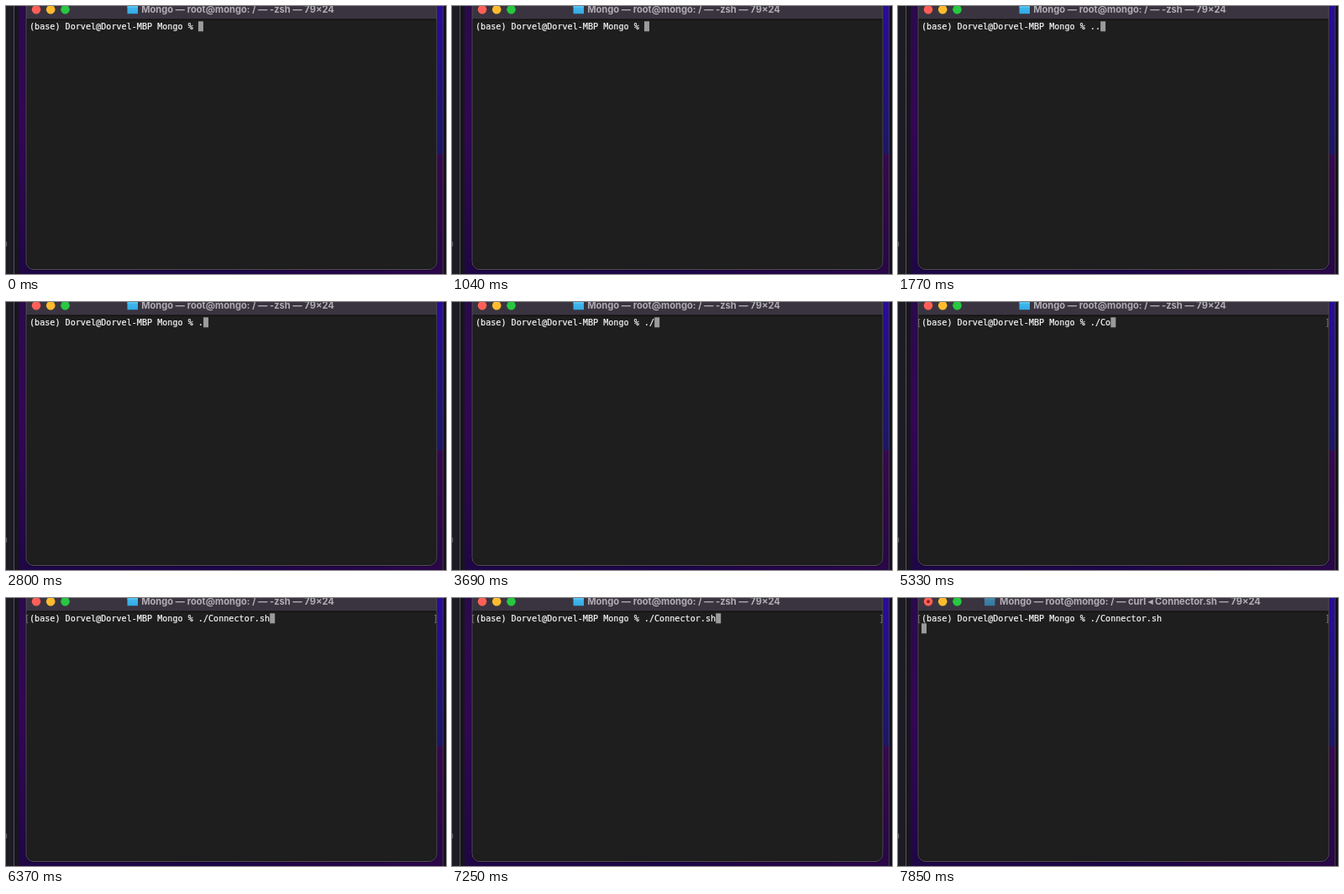
Animation of 524 by 320 pixels, one loop 7.99 s. Source, as an HTML page:

```html
<!DOCTYPE html>
<html lang="en">
<head>
<meta charset="utf-8">
<title>Terminal session</title>
<style>
  html, body { margin: 0; width: 100%; height: 100%; overflow: hidden; background: #17151d; }
  svg { display: block; width: 100vw; height: 100vh; }
  .title { font: 700 11.16px Inter, "Open Sans", sans-serif; fill: #b1adb6; text-anchor: middle; }
  .mono { font: 10.12px "DejaVu Sans Mono", monospace; fill: #f4f4f4; stroke: #f4f4f4; stroke-width: .22; white-space: pre; }
  .mark { fill: #808080; stroke: none; }
</style>
</head>
<body>
<svg viewBox="0 0 524 320">
  <defs>
    <linearGradient id="leftGlow" x2="0" y2="1">
      <stop offset="0" stop-color="#2b0a4c"/>
      <stop offset=".45" stop-color="#330655"/>
      <stop offset="1" stop-color="#1f0745"/>
    </linearGradient>
    <linearGradient id="rightGlow" x2="0" y2="1">
      <stop offset="0" stop-color="#2a0c9c"/>
      <stop offset=".55" stop-color="#1c1768"/>
      <stop offset=".555" stop-color="#38084f"/>
      <stop offset="1" stop-color="#280747"/>
    </linearGradient>
    <linearGradient id="bottomGlow">
      <stop offset="0" stop-color="#1f0745"/>
      <stop offset=".5" stop-color="#1d0448"/>
      <stop offset="1" stop-color="#2a0748"/>
    </linearGradient>
    <linearGradient id="folderBlue" x2="0" y2="1">
      <stop offset="0" stop-color="#45bdf0"/>
      <stop offset="1" stop-color="#33a9e4"/>
    </linearGradient>
  </defs>

  <!-- desktop and neighbouring windows -->
  <rect width="524" height="320" fill="#17151d"/>
  <rect width="9" height="320" fill="#1d1b23"/>
  <rect x="9" width="1" height="320" fill="#57535f"/>
  <rect x="15" width="9" height="320" fill="url(#leftGlow)"/>
  <rect x="513" width="7" height="320" fill="url(#rightGlow)"/>
  <rect x="16" y="305" width="504" height="15" fill="url(#bottomGlow)"/>
  <rect x="520" width="1" height="320" fill="#3d3944"/>
  <rect x="521" width="3" height="320" fill="#141219"/>
  <text x="-4" y="287" font-family="Inter, sans-serif" font-size="10" fill="#777">n</text>

  <!-- terminal window -->
  <rect x="24" y="-20" width="489" height="334.5" rx="9" fill="#1e1e1e" stroke="#000" stroke-opacity=".4" stroke-width="2.5"/>
  <rect x="24" width="489" height="15.600" fill="#39343f"/>
  <rect x="24" y="15.600" width="489" height="1" fill="#0e0e0e"/>
  <rect x="24" y="-20" width="489" height="334.5" rx="9" fill="none" stroke="#55515b"/>
  <circle cx="36" cy="4.3" r="5.3" fill="#ff5f57"/>
  <circle id="busy" cx="36" cy="4.3" r="1.8" fill="#7d1712"/>
  <circle cx="53.2" cy="4.3" r="5.3" fill="#febc2e"/>
  <circle cx="70.5" cy="4.3" r="5.3" fill="#28c840"/>
  <g id="folder">
    <path d="M0-1h5l1 1h6.500v9.300h-12.500z" fill="url(#folderBlue)"/>
    <path d="M0 1.200h12.500" stroke="#60caf5"/>
  </g>
  <text id="title" class="title" y="8.300"></text>

  <rect id="cursor" width="6" height="12" fill="#9b9b9b"/>
  <text id="line" class="mono" x="28" y="28"></text>
  <g id="marks">
    <text class="mono mark" x="22" y="28">[</text>
    <text class="mono mark" x="508.500" y="28">]</text>
  </g>
</svg>
<script>
  const LOOP = 7990, CELL = 6.09, LEFT = 28;
  const PROMPT = "(base) Dorvel@Dorvel-MBP Mongo % ";
  const TYPING = [
    [0, ""], [1330, "."], [1630, ".."], [2650, "."], [3690, "./"],
    [4880, "./C"], [5180, "./Co"], [6070, "./Connector.sh"]
  ];
  const MARKS_AT = 5180, ENTER_AT = 7550, RUN_AT = 7700;
  const el = id => document.getElementById(id);
  const show = (id, on) => el(id).setAttribute("visibility", on ? "visible" : "hidden");

  function setTitle(running) {
    const job = running ? "curl ◂ Connector.sh" : "-zsh";
    el("title").textContent = `Mongo — root@mongo: / — ${job} — 79×24`;
    el("title").setAttribute("x", running ? 276.5 : 276);
    el("folder").setAttribute("transform", `translate(${running ? 103 : 144.5} 0)`);
    el("folder").setAttribute("opacity", running ? 0.6 : 1);
    show("busy", running);
  }

  let shown = "";
  function draw(now) {
    const t = now % LOOP;
    const typed = TYPING.findLast(([at]) => t >= at)[1];
    const marked = t >= MARKS_AT, entered = t >= ENTER_AT, running = t >= RUN_AT;
    const state = [typed, marked, entered, running].join();
    if (state !== shown) {
      shown = state;
      const text = PROMPT + typed;
      el("line").textContent = text;
      el("cursor").setAttribute("x", LEFT + (entered ? 0 : text.length * CELL));
      el("cursor").setAttribute("y", entered ? 30.3 : 18.3);
      show("marks", marked);
      setTitle(running);
    }
  }

  const start = performance.now();
  function tick() {
    draw(performance.now() - start);
    requestAnimationFrame(tick);
  }
  tick();
</script>
</body>
</html>
```
